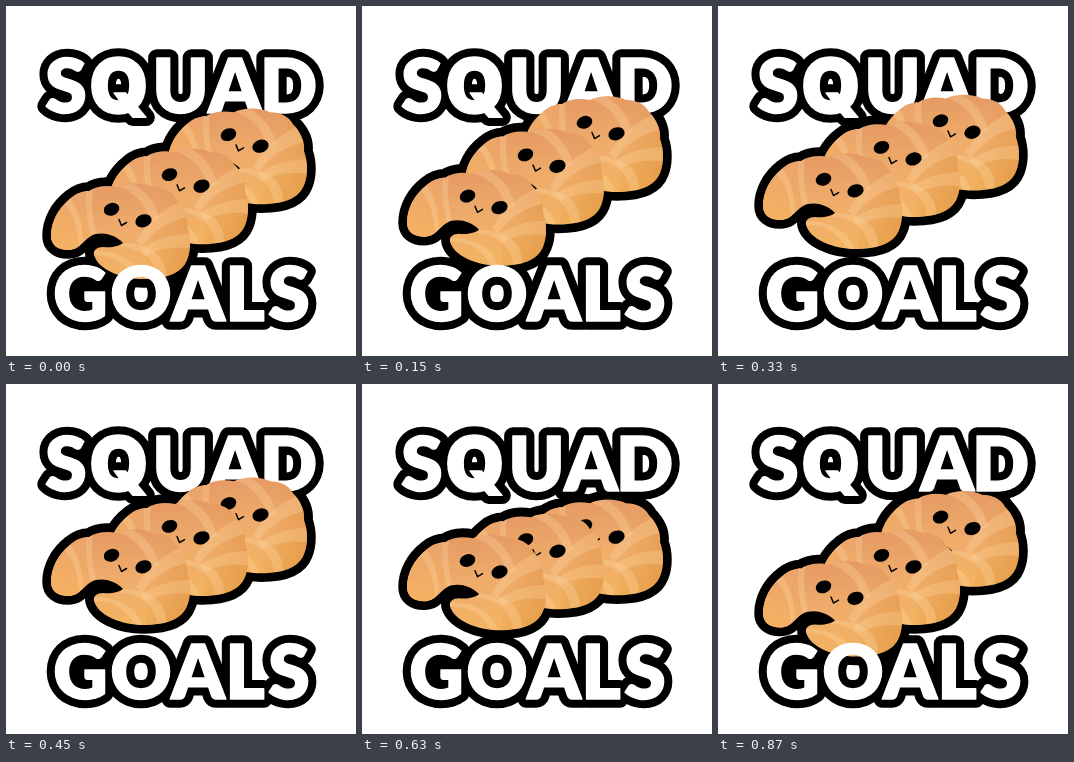
These frames come from a looping animation (350 px wide and 350 px high, 0.9 s). An HTML page:

```html
<!DOCTYPE html>
<html lang="en">
<head>
<meta charset="utf-8">
<title>Squad Goals</title>
<style>
  html, body { margin: 0; width: 100%; height: 100%; overflow: hidden; background: #fff; }
  svg { display: block; width: 100vw; height: 100vh; }
  text { font: 900 75.5px Lato, sans-serif; text-anchor: middle; }
  .round { font-family: Inter, sans-serif; }
  .edge { fill: #000; stroke: #000; stroke-width: 17.5; stroke-linejoin: round; }
  .word { fill: #fff; stroke: #fff; stroke-width: 1.4; stroke-linejoin: round; }
</style>
</head>
<body>
<svg viewBox="0 0 350 350">
  <defs>
    <linearGradient id="dough" gradientUnits="userSpaceOnUse" x1="120" y1="145" x2="124" y2="241">
      <stop offset="0" stop-color="#e59a63"/>
      <stop offset=".5" stop-color="#efac6b"/>
      <stop offset="1" stop-color="#f3b461"/>
    </linearGradient>
    <linearGradient id="arm" gradientUnits="userSpaceOnUse" x1="78" y1="152" x2="58" y2="213">
      <stop offset="0" stop-color="#eaa36b"/>
      <stop offset="1" stop-color="#f5b262"/>
    </linearGradient>
    <linearGradient id="shade" gradientUnits="userSpaceOnUse" x1="145" y1="190" x2="184" y2="204">
      <stop offset="0" stop-color="#e0943f" stop-opacity="0"/>
      <stop offset="1" stop-color="#e0943f" stop-opacity=".6"/>
    </linearGradient>
    <path id="body" d="M45 198C45 184 52 170 65 160C71 155 77 153 83 153C90 148 101 147 111 149
      C121 144 137 144 147 149C157 149 166 153 170 161C178 169 182 179 181 188
      C185 199 185 212 181 222C176 235 160 241 138 241C114 241 92 231 88 217
      C87 212 91 209 97 209C106 210 113 208 117 205C109 196 94 193 85 198
      C77 202 74 212 62 212C52 212 45 207 45 198Z"/>
    <clipPath id="clip"><use href="#body"/></clipPath>
    <g id="bun">
      <use href="#body" fill="url(#dough)"/>
      <g clip-path="url(#clip)">
        <path fill="url(#arm)" d="M40 150H83Q78 176 85 198Q74 216 60 220H40Z"/>
        <path fill="url(#shade)" d="M140 140H190V245H140Z"/>
        <g fill="#ffdcaa" fill-opacity=".28">
          <path d="M57 165Q71 177 73 208L77 203Q76 176 64 160Z"/>
          <path d="M81 152Q78 174 85 198L90 195Q84 172 87 150Z"/>
          <path d="M112 148Q138 158 145 184L153 181Q148 158 126 145Z"/>
          <path d="M130 203Q146 176 175 163L182 179Q154 184 136 208Z"/>
          <path d="M135 211Q158 195 187 196V211Q162 206 141 217Z"/>
          <path d="M117 205Q141 204 154 219Q161 228 160 243L151 243Q151 228 141 219Q131 210 113 208Z"/>
          <path d="M88 213Q112 213 126 225Q134 232 136 243L129 242Q124 230 110 221Q99 217 88 217Z"/>
        </g>
      </g>
      <ellipse cx="105.500" cy="171.300" rx="8" ry="6.200" transform="rotate(-20 105.500 171.300)"/>
      <ellipse cx="137.500" cy="182.800" rx="8.300" ry="6.400" transform="rotate(-20 137.500 182.800)"/>
      <path d="M113 181.500L115.500 187.500L120.500 184.500" fill="none" stroke="#000" stroke-width="1.500"
        stroke-linecap="round" stroke-linejoin="round"/>
    </g>
    <text id="top" x="60 113 174.500 229 282.500" y="107.300">S<tspan class="round">Q</tspan>UAD</text>
    <text id="low" x="74.500 135 192 239 283" y="314.800">GOALS</text>
  </defs>

  <g class="edge">
    <use href="#top"/>
    <use href="#low"/>
    <use href="#body" data-i="2"/>
    <use href="#body" data-i="1"/>
    <use href="#body" data-i="0"/>
  </g>
  <use href="#top" class="word"/>
  <use href="#bun" data-i="2"/>
  <use href="#bun" data-i="1"/>
  <use href="#bun" data-i="0"/>
  <use href="#low" class="word"/>
</svg>
<script>
  const LOOP = 900, STEP = 30, DROP = 32, LEAD = 90;
  const parts = [...document.querySelectorAll('[data-i]')];
  const home = [[0, 0], [58, -30], [117, -57]];

  // cubic-bezier(.345, 0, .32, 1)
  function ease(x) {
    let lo = 0, hi = 1;
    for (let i = 0; i < 24; i++) {
      const s = (lo + hi) / 2, r = 1 - s;
      if (3 * r * r * s * 0.345 + 3 * r * s * s * 0.32 + s * s * s < x) lo = s;
      else hi = s;
    }
    return lo * lo * (3 - 2 * lo);
  }

  // lowest at the loop start, highest halfway, mirrored on the way down
  function bob(t) {
    t %= LOOP;
    return DROP * (1 - ease(Math.min(t, LOOP - t) / (LOOP / 2)));
  }

  function draw(ms) {
    const t = Math.floor((ms % LOOP) / STEP) * STEP;
    for (const el of parts) {
      const i = +el.dataset.i, [x, y] = home[i];
      el.setAttribute('transform', `translate(${x} ${(y + bob(t + i * LEAD)).toFixed(2)})`);
    }
  }

  let start;
  function tick(now) {
    start ??= now;
    draw(Math.max(0, now - start));
    requestAnimationFrame(tick);
  }
  draw(0);
  requestAnimationFrame(tick);
</script>
</body>
</html>
```
